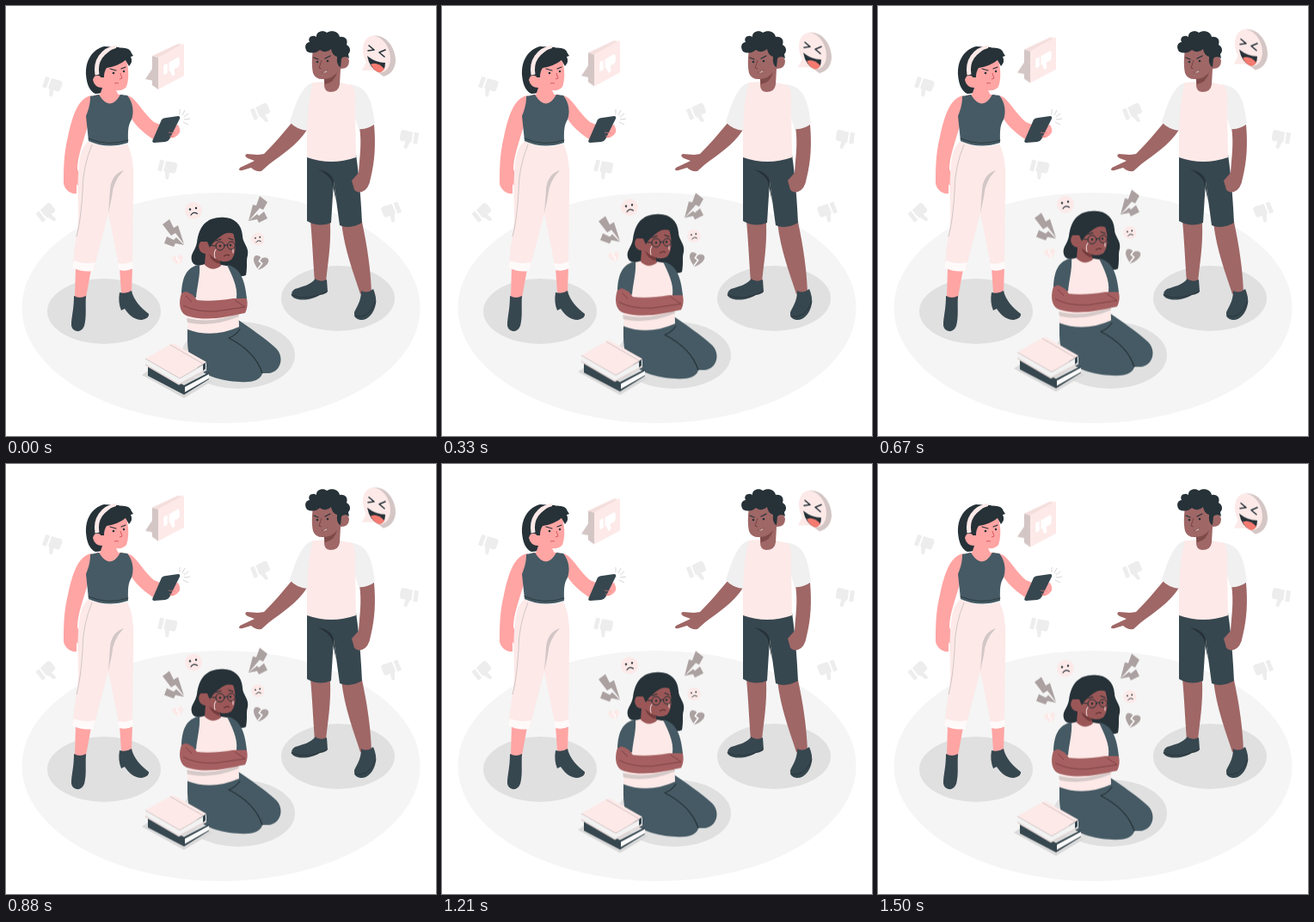
These frames come from a looping animation (500x500 px, 1.54 s). An HTML page without scripts:

```html
<!DOCTYPE html>
<html lang="en">
<head>
<meta charset="utf-8">
<title>Mocked</title>
<style>
  html, body { margin: 0; width: 100%; height: 100%; overflow: hidden; background: #fff; }
  svg { display: block; width: 100%; height: 100%; }
  .ink { fill: #263238; }
  .slate { fill: #455a64; }
  .deep { fill: #37474f; }
  .blush { fill: #fce9e8; }
  .rose { fill: #ffa5a4; }
  .brown { fill: #9f6766; }
  .umber { fill: #9b5757; }
  .sienna { fill: #a66061; }
  .mute { fill: #aca1a1; }
  .side { fill: #d3c6c5; }
  .shade { fill: #e0e0e0; }
  .line { fill: none; stroke: #263238; stroke-linecap: round; stroke-linejoin: round; }
  .float { animation: float 1540ms linear infinite; }
  @keyframes float { 50% { transform: translateY(-8.6px); } }
</style>
</head>
<body>
<svg viewBox="0 0 500 500">
  <defs>
    <g id="thumb">
      <path d="M-11-8h5V5h-5zM-4-8 7-9Q10-9 10-5V1Q10 4 7 4H3L4 11Q2 14 0 11L-2 5-4 3Z"/>
    </g>
    <g id="sad">
      <circle r="10" class="blush"/>
      <circle cx="-4" cy="-1.5" r="1.2" class="ink"/>
      <circle cx="3" cy="-3" r="1.2" class="ink"/>
      <path d="M-3 5Q0 .5 4.500 3.500" class="line" stroke-width="1.200"/>
    </g>
    <g id="heart">
      <path d="M0 9C-14-1-9-11 0-5C9-11 14-1 0 9Z"/>
      <path d="M0-6-2-1 2 1-1 8" fill="none" stroke="#fff" stroke-width="1.500"/>
    </g>
  </defs>

  <ellipse cx="250" cy="351" rx="231.500" ry="134" fill="#f5f5f5"/>
  <ellipse cx="114" cy="355" rx="66" ry="38" class="shade"/>
  <ellipse cx="386" cy="340" rx="66" ry="38" class="shade"/>
  <ellipse cx="270" cy="406" rx="66" ry="39" class="shade"/>

  <g fill="#ededed">
    <use href="#thumb" transform="translate(54 93) rotate(20)"/>
    <use href="#thumb" transform="translate(188 189) rotate(14)"/>
    <use href="#thumb" transform="translate(48 241) rotate(-38)"/>
    <use href="#thumb" transform="translate(297 124) rotate(-22)"/>
    <use href="#thumb" transform="translate(468 154) scale(-1 1) rotate(-8)"/>
    <use href="#thumb" transform="translate(448 239) scale(-1 1) rotate(22)"/>
  </g>

  <!-- woman with phone -->
  <g>
    <g class="rose">
      <path d="M81 304 99 306 93 339Q86 342 80 338ZM132 304 147 303 146 333Q140 337 134 333Z"/>
      <path d="M100 104C85 106 78 124 72 152C67 172 67 190 67 207C69 214 75 219 82 218L82 207 89 216C90 204 86 196 83 190C83 176 89 160 95 140Z"/>
      <path d="M141 104C152 107 157 122 172 135L184 140 174 157C162 149 152 141 146 131Z"/>
      <path d="M105 103H136V118H108Z"/>
    </g>
    <path class="deep" d="M79 337Q86 341 93 337C92 350 94 360 91 372Q88 379 82 378Q75 376 76 368C77 358 79 350 79 337ZM132 333Q140 335 146 331C148 342 158 352 166 358Q167 363 158 365C148 365 142 358 138 352L134 354Q130 345 132 333Z"/>
    <path class="blush" d="M96 157Q120 168 141 160C147 172 149 188 148 210L147 305Q139 309 132 306L119 241 102 306Q90 310 78 302C78 290 82 270 84 250C84 225 82 200 86 176Q88 164 96 157Z"/>
    <path d="M79 296Q90 301 104 298L101 308Q89 310 77 304ZM130 299Q140 301 147 297L148 305Q140 309 132 307Z" fill="#fffafa"/>
    <path d="M137 191Q122 196 121 214L119 241 123 222Q124 204 137 191Z" fill="#d2c6c6"/>
    <path d="M100 161Q89 188 89 216Q87 250 82 268" fill="none" stroke="#d2c6c6"/>
    <path class="slate" d="M98 105 108 103Q121 124 133 103L141 104C148 112 149 124 146 132C141 140 142 148 142 159Q118 167 96 157L93 128C97 118 98 112 98 105Z"/>
    <path d="M96 154Q118 164 142 156" class="line" stroke-width=".8"/>

    <path class="ink" d="M114 47C99 51 92 65 93 80C94 91 97 99 104 102Q112 102 116 98L122 68 132 48Z"/>
    <path class="rose" d="M113 73Q127 67 140 63C143 74 143 86 140 94Q136 99 128 98L131 104H109L112 95Q103 95 101 86Q103 78 110 82Z"/>
    <path d="M106 80C103 64 112 51 128 48" fill="none" stroke="#fce9e8" stroke-width="5"/>
    <path class="ink" d="M110 83C108 64 116 52 128 49Q144 47 146 55L148 58 145 59Q148 65 143 70L139 63Q130 70 117 72Q114 76 114 83Z"/>
    <path d="M121 73 128 75M134 73 139 71" class="line" stroke-width="1.200"/>
    <circle cx="125" cy="78" r="1.300" class="ink"/>
    <circle cx="137" cy="76" r="1.200" class="ink"/>
    <path d="M133 78 135 84 132 85M126 90Q129 89 131 90" fill="none" stroke="#d65a5d"/>

    <path class="rose" d="M186 142 200 138Q203 143 202 147Q197 155 189 153Z"/>
    <path class="deep" d="M181 132Q183 130 186 130L200 128Q203 128 202 131L190 155Q188 158 185 158L172 159Q169 158 171 155Z"/>
    <path d="M189 147 197 148M190 151 195 152" stroke="#e57f7f" stroke-width=".7"/>
    <path d="M202 126V120M205 127 208 121M207 129 212 125M207 132 214 131M206 135 212 138" stroke="#d6d6d6"/>
  </g>

  <!-- pointing man -->
  <g>
    <g class="brown">
      <path d="M333 135C322 148 312 160 300 172L293 173 280 172Q276 174 281 177L289 180 272 188Q269 192 275 191L285 188Q290 193 297 192L306 184C322 172 338 162 350 144Z"/>
      <path d="M354 250 377 252C378 280 374 300 372 321H359C357 295 356 270 354 250ZM390 252 414 251C420 280 424 305 425 333L412 335C404 310 394 285 390 252Z"/>
    </g>
    <path class="deep" d="M359 317Q366 322 373 318L374 332Q372 335 365 336C356 342 340 344 333 338Q330 333 336 329C346 326 354 324 359 318ZM413 331Q420 335 427 329Q431 338 430 346C428 358 420 366 412 365Q404 364 405 356C409 348 413 342 413 331Z"/>
    <path d="M332 336Q350 344 373 332M406 361Q422 364 430 344" class="line" stroke-width=".8"/>
    <path class="deep" d="M350 173H407C411 200 413 230 414 252Q400 260 388 255L381 204 378 252Q364 258 350 250Z"/>
    <path class="ink" d="M363 190Q379 193 381 204L384 228 379 204Q375 196 363 190Z"/>
    <path class="brown" d="M411 141 428 138C430 160 429 180 424 200Q422 213 414 216Q405 218 404 210L402 203 410 194C411 176 414 160 411 141Z"/>
    <path d="M357 89C344 93 338 110 330 135Q338 144 351 145L358 110ZM400 91C418 94 425 104 429 137Q420 144 410 143L400 110Z" fill="#f0f0f0"/>
    <path class="blush" d="M357 89 371 88Q379 106 388 89L402 92C408 98 406 110 406 120L407 176Q378 186 350 176V145C351 122 352 108 357 89Z"/>

    <path class="brown" d="M357 50 386 46 389 61Q397 55 399 64Q399 73 389 73L388 91Q387 100 377 100Q370 99 370 92V85Q360 86 357 78C355 68 356 58 357 50Z"/>
    <path d="M370 85Q380 84 385 77Q382 89 371 91Z" fill="#7e4a4a"/>
    <path class="ink" d="M350 53C346 47 349 42 353 42C350 36 357 33 361 36C360 30 369 27 373 31C379 27 387 30 388 36C395 35 398 40 396 45C401 48 401 53 398 56L399 61Q394 57 390 61L389 71Q384 69 385 59Q379 57 378 50Q372 56 365 51Q358 57 350 53Z"/>
    <path d="M358 60 363 62M371 61 377 58" class="line" stroke-width="1.300"/>
    <circle cx="362" cy="65" r="1.300" class="ink"/>
    <circle cx="374" cy="64" r="1.300" class="ink"/>
    <path d="M367 63 364 72 367 73" fill="none" stroke="#6f3c3d" stroke-width=".8"/>
    <path d="M367 77Q371 77 374 74 374 78 370 78Z" fill="#f3d9d6" stroke="#6f3c3d" stroke-width=".6"/>
  </g>

  <g class="float">
    <!-- reaction bubble -->
    <path class="side" d="M170 58 177 60V97L170 92Z"/>
    <path d="M170 58 200 44 206 45 177 60Z" fill="#f4dedc"/>
    <path class="side" d="M162 85 170 73 177 78V88Z"/>
    <path class="blush" d="M177 60 205 44Q207 44 207 46V81L177 97Z"/>
    <g transform="translate(193 71) skewY(-26) scale(.88)" fill="#fff"><use href="#thumb"/></g>

    <!-- laughing bubble -->
    <path class="side" d="M425 35C440 31 453 47 453 64Q452 78 439 82L427 73Z"/>
    <path class="blush" d="M414 75 419 65 429 75Z"/>
    <ellipse cx="431" cy="56" rx="15" ry="22" transform="rotate(-20 431 56)" class="blush"/>
    <path d="M422 46 428 51 421 52M441 51 434 54 440 59" class="line" stroke-width="1.600"/>
    <path class="ink" d="M420 58Q430 66 441 66Q441 77 433 77Q423 73 420 58Z"/>
    <path d="M424 68Q431 64 440 73Q437 78 433 77 428 75 424 68Z" fill="#f47a70"/>

    <!-- hurt symbols -->
    <use href="#sad" transform="translate(218 238)"/>
    <use href="#sad" transform="translate(293 271) scale(.76)"/>
    <path class="mute" d="M190 248 195 258 200 255 207 277 197 264 192 267 182 254ZM187 268 195 272 198 269 207 278 197 276 195 280 184 276ZM295 221 304 228 299 237 295 235 282 250 287 231 291 232ZM300 239 304 247 294 252 292 248 282 250 292 242 294 244Z"/>
    <use href="#heart" class="mute" transform="translate(296 298) rotate(14)"/>
    <use href="#heart" class="blush" transform="translate(200 295) rotate(-12) scale(.72)"/>

    <!-- seated girl -->
    <path class="ink" d="M248 246C264 244 274 253 275 267C275 276 283 280 281 290C279 296 281 302 279 313Q272 316 266 312L250 304 234 300C226 303 218 303 216 296C214 288 220 285 222 275C224 260 230 247 248 246Z"/>
    <path class="slate" d="M211 374Q240 383 270 365C282 373 302 387 314 398C324 408 320 425 306 427H298C296 436 284 438 272 437C250 436 228 430 216 414C210 402 211 388 211 374Z"/>
    <path d="M272 376Q266 384 259 386 290 402 298 427" class="line" stroke-width="1.200"/>
    <path class="blush" d="M220 303 232 300Q241 309 250 301L262 303Q270 316 270 335L271 373Q240 387 211 376L213 335Z"/>
    <path d="M210 363Q240 370 270 357L271 361Q240 374 211 368Z" fill="#d6cac9"/>
    <path class="slate" d="M225 301C209 303 204 318 204 337Q212 342 221 339C222 326 226 314 225 301ZM257 301C273 304 278 320 280 340Q274 343 268 340C270 326 262 312 257 301Z"/>
    <path class="sienna" d="M204 334C200 346 202 359 213 361C236 367 258 361 278 357Q282 350 280 340L264 340Q240 344 222 342Q217 334 209 332Z"/>
    <path d="M206 348Q220 356 244 355L278 350M209 337 216 344M266 342 278 350" fill="none" stroke="#743c3d" stroke-width=".8"/>

    <path class="umber" d="M235 275Q246 266 263 261C268 273 268 288 262 295Q255 299 248 296L250 302Q240 310 231 301L232 288C223 287 222 276 228 273Q233 272 235 275Z"/>
    <path d="M248 296Q240 293 236 288 239 298 249 300Z" fill="#743c3d"/>
    <path class="ink" d="M227 274C230 255 242 248 256 249Q270 252 270 266L265 265Q257 261 248 269 240 275 237 281L234 274Z"/>
    <path d="M244 273 250 271M259 270 264 272" class="line" stroke-width="1.200"/>
    <g class="line">
      <circle cx="249" cy="279" r="5"/>
      <circle cx="262" cy="278.500" r="4.500"/>
      <path d="M254 278H258M236 278 244 279"/>
    </g>
    <circle cx="249" cy="279" r="1.300" class="ink"/>
    <circle cx="261" cy="278" r="1.300" class="ink"/>
    <path d="M244 283Q241 287 243 293M264 283V287" fill="none" stroke="#f6e6e6" stroke-linecap="round"/>
    <path d="M253 291Q257 288 260 290" fill="none" stroke="#4f2628"/>

    <!-- books -->
    <path d="M158 429 168 422 240 436 207 456Z" fill="#d9d9d9"/>
    <path class="deep" d="M165 418 207 441 236 426V434L207 452 165 430Z"/>
    <path d="M208 443 236 428V433L208 449Z" fill="#fafafa"/>
    <path d="M162 410 202 432 233 415V423L201 440 162 417Z" fill="#f2f2f2"/>
    <path d="M162 417 201 440 233 423" fill="none" stroke="#e3d6d5" stroke-width="1.500"/>
    <path d="M162 410 192 393Q194 392 196 393L233 414 202 433Z" class="blush"/>
    <path d="M162 410 202 433 233 415M191 394 229 416" fill="none" stroke="#d3c6c5"/>
    <path class="deep" d="M229 417 232 415V422L229 424Z"/>
  </g>
</svg>
</body>
</html>
```
